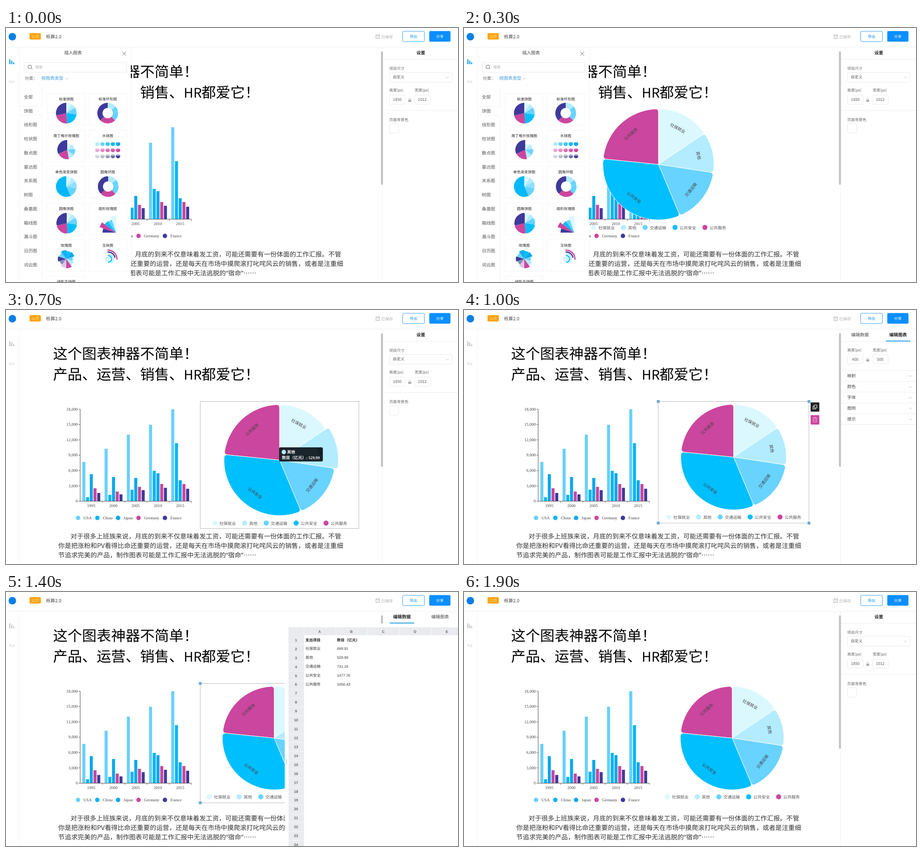
Recreate the animation shown at these times as an HTML page. Size 960 px wide and 540 px high, loop 2000 ms.

```html
<!DOCTYPE html>
<html lang="zh-CN">
<head>
<meta charset="utf-8">
<title>图表编辑器</title>
<style>
html, body { margin: 0; width: 100%; height: 100%; overflow: hidden; background: #fff; }
svg { display: block; width: 100%; height: 100%; }
text { font-family: 'Noto Sans CJK SC', 'Noto Sans CJK', 'Noto Sans', sans-serif; white-space: pre; text-rendering: geometricPrecision; }
.serif { font-family: 'Liberation Serif', 'Noto Sans CJK SC', serif; }
.grid { font-family: 'Liberation Sans', 'Noto Sans CJK SC', sans-serif; }
.quote { font-family: 'Noto Sans', sans-serif; }
</style>
</head>
<body>
<svg id="stage" viewBox="0 0 960 540"></svg>
<script>
const PALE = '#dbf8ff', LIGHT = '#b3ecff', SKY = '#68d3ff', BLUE = '#00bfff',
      PINK = '#cb469e', NAVY = '#3f3a9b', ACCENT = '#0a8fff', LINE = '#eceef0';

const text = (x, mid, size, str, fill = '#444', attrs = '') =>
  `<text x="${x}" y="${mid + size * 0.37}" font-size="${size}" fill="${fill}" ${attrs}>${str}</text>`;
const centered = (x, mid, size, str, fill, attrs = '') =>
  text(x, mid, size, str, fill, `text-anchor="middle" ${attrs}`);
const rect = (x, y, w, h, fill, attrs = '') =>
  `<rect x="${x}" y="${y}" width="${w}" height="${h}" fill="${fill}" ${attrs}/>`;
const frame = (x, y, w, h, stroke = '#e9eaed', r = 2) =>
  rect(x + 0.5, y + 0.5, w, h, '#fff', `stroke="${stroke}" rx="${r}"`);
const dot = (x, y, r, fill) => `<circle cx="${x}" cy="${y}" r="${r}" fill="${fill}"/>`;
const path = (d, stroke, width = 1, fill = 'none') =>
  `<path d="${d}" fill="${fill}" stroke="${stroke}" stroke-width="${width}"/>`;
const chevron = (x, y) => path(`M${x - 3} ${y - 1.5}l3 3 3-3`, '#b5b8bd', 0.9);
const each = (list, fn) => list.map(fn).join('');
const group = (id, body) => `<g id="${id}">${body}</g>`;

// Angles in degrees, clockwise from the top.
function sector(cx, cy, r, from, to, fill, { hole = 0, round = 0, stroke = 'none' } = {}) {
  const at = (radius, deg) => {
    const a = deg * Math.PI / 180;
    return (cx + radius * Math.sin(a)).toFixed(2) + ' ' + (cy - radius * Math.cos(a)).toFixed(2);
  };
  const d = round / r * 180 / Math.PI, big = to - from > 180 ? 1 : 0;
  const inner = hole ? `A${hole} ${hole} 0 ${big} 0 ${at(hole, from)}` : '';
  return path(`M${at(hole, from)}L${at(r - round, from)}Q${at(r, from)} ${at(r, from + d)}` +
    `A${r} ${r} 0 ${big} 1 ${at(r, to - d)}Q${at(r, to)} ${at(r - round, to)}L${at(hole, to)}${inner}Z`,
    stroke, 1, fill);
}

function miniPie(x, y, r, stops, colors, options) {
  return each(colors, (c, i) => sector(x, y, Array.isArray(r) ? r[i] : r, stops[i], stops[i + 1], c, options));
}

function header() {
  return rect(0, 0, 960, 40, '#fff') + rect(0, 40, 960, 1, LINE) +
    dot(13.5, 18.5, 8, '#0b7fe6') +
    rect(50, 11, 24, 13.5, '#ffa30f', 'rx="2"') + centered(62, 17.7, 8, '公开', '#ffe0a3') +
    text(85, 18, 9.6, '栎算2.0') +
    path('M785.5 14.5h8v8h-8zM787 14.5v2.5h5v-2.5M787 20l2 1.5 3-3', '#b5b5b5', 0.9) +
    text(797, 19, 8.2, '已保存', '#aaa') +
    frame(842, 6.5, 46, 22, '#3d9ff2') + centered(865.5, 18, 8, '导出', ACCENT) +
    rect(899, 6.5, 45, 22.5, ACCENT, 'rx="2"') + centered(921.5, 18, 8, '分享', '#fff');
}

function sidebar() {
  return rect(0, 41, 28, 499, '#fff') + rect(28, 41, 1, 499, '#f3f4f5') +
    group('barIcon', rect(7, 66.5, 2.4, 10.5) + rect(11, 69.5, 2.4, 7.5) + rect(15, 73, 2.4, 4)) +
    text(6.5, 113, 9.5, 'Aa', '#cfd2d6', 'font-weight="500"');
}

function article() {
  const head = 30.8, body = 13.7, ink = '#333';
  return text(100, 92.5, head, '这个图表神器不简单！', '#000') +
    text(100, 136.5, head, '产品、运营、销售、', '#000') +
    text(377.5, 138, 28, 'HR', '#000') + text(415, 136.5, head, '都爱它！', '#000') +
    text(137, 480.5, body, '对于很多上班族来说，月底的到来不仅意味着发工资，可能还需要有一份体面的工作汇报。不管', ink) +
    text(111, 500.8, body, '你是把涨粉和PV看得比命还重要的运营，还是每天在市场中摸爬滚打叱咤风云的销售，或者是注重细', ink) +
    text(111, 521.1, body, '节追求完美的产品，制作图表可能是工作汇报中无法逃脱的' +
      '<tspan class="quote">“</tspan>宿命<tspan class="quote">”</tspan>……', ink);
}

function barChart() {
  const colors = ['#68d0fb', '#04b4f5', '#08a7ee', PINK, NAVY], band = 47.2;
  const heights = [[83, 8, 57, 27, 17], [111, 13, 51, 20, 14], [141, 24, 49, 30, 23],
                   [162, 64, 59, 36, 28], [195, 123, 44, 36, 26]];
  const legend = [[153, 'USA'], [194, 'China'], [238, 'Japan'], [281.5, 'Germany'], [337.5, 'France']];
  let out = '';
  for (let i = 0; i <= 6; i++) {
    const y = 406.5 - i * 32.6;
    out += path(`M154 ${y}h4`, '#666') +
      text(152.5, y - 0.5, 8.9, (i * 3000).toLocaleString('en-US'), '#444', 'class="serif" text-anchor="end"');
  }
  heights.forEach((set, i) => {
    const x = 158 + i * band;
    out += each(set, (h, k) => rect(x + 4.2 + k * 7.9, 406 - h, 6.4, h, colors[k])) +
      path(`M${x + band} 406v4`, '#666') +
      centered(x + 23, 415.5, 8.8, 1995 + i * 5, '#444', 'class="serif"');
  });
  return out + path('M157.5 211V406.5H393.5', '#555') +
    each(legend, ([x, name], i) => dot(x, 442, 4.7, colors[i]) +
      text(x + 11.5, 441.5, 8.8, name, '#444', 'class="serif"'));
}

const SLICES = [['社保就业', 699.91, PALE], ['其他', 529.99, LIGHT], ['交通运输', 731.16, SKY],
                ['公共安全', 1477.76, BLUE], ['公共服务', 1050.43, PINK]];
const TOTAL = SLICES.reduce((sum, s) => sum + s[1], 0);
const LEGEND_X = [0, 63.3, 109.2, 172.7, 236.2];

function pieChart({ x, y, scale, box, handles, hover }) {
  const cx = x + 169 * scale, cy = y + 125 * scale, r = 118 * scale;
  const w = 337 * scale, h = 270 * scale + (scale < 1 ? 2 : 0);
  let out = '', labels = '', angle = 0;
  SLICES.forEach(([name, value, color], i) => {
    const sweep = value / TOTAL * 360, mid = angle + sweep / 2, lit = hover && i === 1;
    out += sector(cx, cy, lit ? r * 1.06 : r, angle, angle + sweep, color, { round: 7, stroke: '#fff' });
    const a = mid * Math.PI / 180, flip = mid > 90 && mid < 270 ? 180 : mid > 270 ? 360 : 0;
    const lx = cx + Math.sin(a) * r * 0.74, ly = cy - Math.cos(a) * r * 0.74;
    labels += `<g transform="translate(${lx} ${ly}) rotate(${mid - flip})">` +
      centered(0, 0, 8.8, name, '#444', 'class="serif"') + '</g>';
    const dx = cx - 137.5 + LEGEND_X[i], dy = y + 259 * scale;
    labels += dot(dx, dy, 5.4, color) + text(dx + 9.7, dy + 0.5, 8.8, name, '#555', 'class="serif"');
    angle += sweep;
  });
  out += labels;
  if (box) out += rect(x + 0.5, y + 0.5, w, h, 'none', 'stroke="#b9bbbd"');
  if (handles) {
    out += each([[0, 0], [w, 0], [0, h], [w, h]], ([dx, dy]) => rect(x + dx - 2.5, y + dy - 2.5, 6, 6, '#6eaad3'));
    const bx = x + w + 4;
    out += rect(bx, y + 2.5, 18.5, 19.5, '#222', 'rx="1"') + rect(bx, y + 29.5, 18.5, 20, PINK, 'rx="1"') +
      path(`M${bx + 7.5} ${y + 8}h6v6h-6zM${bx + 7} ${y + 10.5}h-2v6h6v-2`, '#fff') +
      path(`M${bx + 4.5} ${y + 36}h9.5m-6.500 0v-2h3.5v2m-5.500 0v8h7.5v-8m-5 2.500v3m2.500-3v3`, '#f0c4e0', 0.9);
  }
  if (hover) {
    const white = 'class="serif" font-weight="700"';
    out += rect(580, 292, 93, 30, '#0b0f14', 'rx="3" opacity=".9"') + dot(590, 302, 4.7, LIGHT) +
      text(597, 301.5, 8.6, '其他', '#fff', white) +
      text(586, 313.5, 8.6, '数目（亿元）: 529.99', '#fff', white);
  }
  return out;
}

function thumbnails() {
  const pieStops = [0, 30, 58, 98, 175, 257, 360], pieColors = [PALE, LIGHT, SKY, BLUE, PINK, NAVY];
  const ringStops = [0, 50, 80, 135, 225, 360], ringColors = [LIGHT, SKY, SKY, PINK, NAVY];
  const titles = ['标准饼图', '标准环形图', '南丁格尔玫瑰图', '水球图', '单色渐变饼图', '圆角环图',
                  '圆角饼图', '扇形玫瑰图', '玫瑰图', '玉玦图', '线形玉玦图'];
  const tones = [[LIGHT, SKY, '#3cc6fb', '#14b9f7', '#00a9f0'], ['#eba9d4', '#e48bc5', '#da6bb4', '#d156a8', PINK],
                 ['#cfd3d8', '#b6bac3', '#9298ad', '#6c6ba1', NAVY]];
  const petals = [17, 18, 14, 17, 20, 19, 15, 18, 16, 19];
  const petalColors = [BLUE, '#08a7ee', SKY, LIGHT, PINK, '#d9c9e6', '#8a8db8', NAVY, SKY, '#14b0f2'];
  const rings = [[20, 95, PINK], [16, 80, NAVY], [12, 140, LIGHT], [8.5, 180, BLUE]];

  return each(titles, (name, i) => {
    const left = i % 2 === 0, y = 139.5 + (i >> 1) * 77.7;
    return rect(left ? 87.5 : 176.5, y, 80, 67, '#fff', 'stroke="#f5f5f6"') +
      centered(left ? 128 : 216, y + 11.5, 7.8, name, '#222', 'font-weight="500"');
  }) +
    miniPie(128, 181, 22, pieStops, pieColors) +
    miniPie(216, 181, 22, ringStops, ringColors, { hole: 11 }) +
    miniPie(130, 259, [13, 15, 17, 18, 20, 21], [0, 40, 85, 130, 170, 245, 360], [PALE, LIGHT, SKY, LIGHT, PINK, NAVY]) +
    miniPie(128, 337, 22, [0, 32, 62, 100, 155, 360], [PALE, LIGHT, '#8fe0ff', SKY, '#00b8fa']) +
    miniPie(217, 337, 22, ringStops, ringColors, { hole: 11, round: 2 }) +
    miniPie(129, 415, 22, pieStops, pieColors, { round: 2 }) +
    miniPie(234, 435, [29, 37, 30, 29, 36], [-90, -72, -54, -36, -18, 0], [NAVY, PINK, BLUE, SKY, PALE]) +
    each(tones, (row, j) => each(row, (c, i) => {
      const x = 194 + i * 11, y = 246.5 + j * 13;
      return dot(x, y, 4.6, c) + rect(x - 5, y - 5, 10, 2 + j, '#fff', 'opacity=".6"');
    })) +
    each(petals, (r, i) => sector(128, 491, r, i * 36, i * 36 + 36, petalColors[i])) +
    each(rings, ([r, end, c]) => sector(217, 491, r, -5, end, c, { hole: r - 2.6 })) +
    `<circle cx="215.5" cy="491.5" r="3.6" fill="#fff" stroke="${SKY}"/>`;
}

function insertPanel() {
  const kinds = ['全部', '饼图', '线形图', '柱状图', '散点图', '雷达图', '关系图', '树图', '桑基图', '箱线图', '漏斗图', '日历图', '词云图'];
  return rect(265, 41, 3, 499, '#000', 'opacity=".02"') + rect(29, 41, 236, 499, '#fff') +
    centered(142.5, 53, 9.4, '插入图表') + path('M247 50.5l8 8m0-8l-8 8', '#666') +
    frame(38, 73, 218, 20.5) +
    '<circle cx="50.5" cy="82.5" r="3.8" fill="none" stroke="#666"/>' + path('M53.5 85.5l2.5 2.5', '#666') +
    text(62, 83.5, 8, '搜索', '#b0b3b8') +
    text(40, 107, 8.8, '分类：', '#555') + text(75, 107, 9.4, '按图表类型', '#3f9fdd') + chevron(129, 107.5) +
    path('M76.5 127V166.5H29M29 185.5H76.5V540', '#f1f2f3') +
    each(kinds, (k, i) => text(38, 146.3 + i * 29.75, 9.4, k, '#555')) +
    thumbnails();
}

function sizeFields(y, h, w) {
  const mid = y + 19.5;
  return text(814, y, 8, '高度(px)', '#666') + text(868, y, 8, '宽度(px)', '#666') +
    frame(814, y + 9.5, 33.5, 19.5) + frame(867.5, y + 9.5, 33, 19.5) +
    centered(831, mid, 8.3, h, '#555') + centered(884, mid, 8.3, w, '#555') +
    rect(854.5, mid + 0.5, 6, 4.5, '#aaa') + path(`M855.8 ${mid + 0.5}v-2a1.7 1.7 0 0 1 3.4 0v2`, '#bbb', 0.8);
}

function settingsPanel() {
  return centered(881, 53, 9.2, '设置', '#222', 'font-weight="700"') + rect(801, 66, 159, 1, LINE) +
    text(814, 86, 8.1, '项目尺寸', '#666') + frame(814, 94, 133, 20.5) +
    text(821.5, 104, 8.2, '自定义', '#555') + chevron(937, 105) +
    sizeFields(132.5, 1850, 1012) + rect(801, 175, 159, 1, LINE) +
    text(814, 195, 8.1, '页面背景色', '#666') + frame(814, 203, 19.5, 20);
}

function tabs(active) {
  return each(['编辑数据', '编辑图表'], (name, i) => {
    const x = 841 + i * 81, on = i === active;
    return centered(x, 53, 9.4, name, on ? '#222' : '#444', on ? 'font-weight="700"' : '') +
      (on ? rect(x - 26, 65, 52, 2, '#31a5e8') : '');
  });
}

function stylePanel() {
  return rect(801, 66, 159, 1, LINE) + tabs(1) + sizeFields(85, 400, 500) + rect(801, 128, 159, 1, LINE) +
    each(['映射', '颜色', '字体', '图例', '提示'], (name, i) => {
      const y = 140 + i * 22.95;
      return text(814, y, 9, name) + chevron(948, y + 0.5) + rect(801, Math.round(y + 11), 159, 1, LINE);
    });
}

function dataPanel() {
  const top = 102, step = 18.92, bold = 'font-weight="700"';
  const head = (x, y, str) => centered(x, y, 7.8, str, '#666', `class="grid" ${bold}`);
  let out = rect(592, 67, 368, 473, '#fff') + tabs(0) +
    rect(600, 75, 360, 17, '#e9ebee') + rect(600, 92, 33, 448, '#e9ebee') +
    path('M594 355v11m2.5-11v11', '#bbb', 0.8) +
    each([...'ABCDE'], (c, i) => head(666 + i * 67.6, 84, c) + rect(632.5 + i * 67.6, 75, 1, 17, '#f8f9fa'));
  for (let i = 0; i < 24; i++) out += head(616, top + i * step, i + 1) + rect(600, top + (i + 0.5) * step, 33, 0.8, '#f8f9fa');
  return out + text(636, top, 8, '支出项目', '#222', bold) + text(703, top, 8, '数目（亿元）', '#222', bold) +
    each(SLICES, ([name, value], i) => {
      const y = top + (i + 1) * step - 0.5;
      return text(636, y, 8, name, '#333') + text(703, y, 7.8, value.toFixed(2), '#333', 'class="grid"');
    });
}

const stage = document.getElementById('stage');
stage.innerHTML = rect(0, 0, 960, 540, '#fff') + article() + barChart() + group('pie', '') +
  rect(799, 41, 161, 499, '#fff') + rect(799, 41, 1, 499, '#f1f2f3') +
  rect(796.5, 50, 4, 283, '#bfbfbf', 'rx="1"') +
  group('settings', settingsPanel()) + group('style', stylePanel()) + group('data', dataPanel()) +
  sidebar() + group('insert', insertPanel()) + header();

const node = id => document.getElementById(id);
const show = (id, on) => node(id).setAttribute('display', on ? 'inline' : 'none');
const ramp = (t, a, b) => Math.min(1, Math.max(0, (t - a) / (b - a)));

function render(t) {
  const inserting = t < 400, added = t >= 200;
  const styling = t >= 800 && t < 1300, data = t >= 1300 && t < 1800;
  const drag = ramp(t, 500, 700);
  const scale = 1 - 0.05 * ramp(t, 800, 1000) - 0.018 * ramp(t, 1000, 1100);
  show('insert', inserting);
  show('settings', !styling && !data);
  show('style', styling);
  show('data', data);
  node('barIcon').setAttribute('fill', inserting ? '#12a5ee' : '#c6c9cd');
  node('pie').innerHTML = added ? pieChart({
    x: 244 + 168 * drag, y: 165 + 29 * drag, scale,
    box: t >= 400 && t < 1800, handles: styling || data, hover: t === 700
  }) : '';
}

const STEP = 100, LOOP = 2000, start = performance.now();
let last = -1;
function tick() {
  const t = Math.floor(((performance.now() - start) % LOOP) / STEP) * STEP;
  if (t !== last) render(last = t);
  requestAnimationFrame(tick);
}
tick();
</script>
</body>
</html>
```
